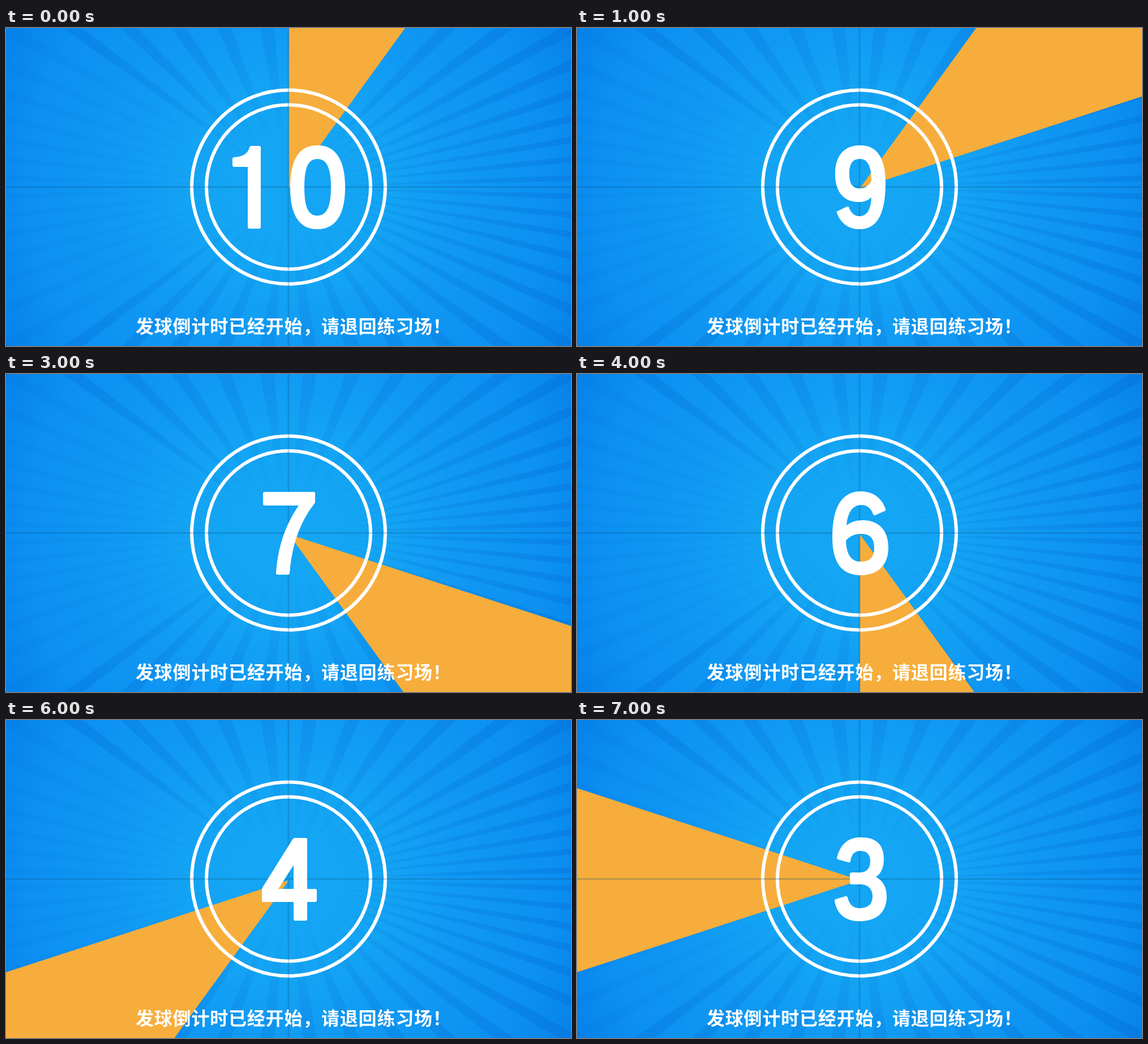
An HTML page that plays this animation: 998 by 561 pixels, repeating every 8 s.

```html
<!DOCTYPE html>
<html lang="zh-CN">
<head>
<meta charset="utf-8">
<title>倒计时</title>
<style>
html, body { margin: 0; width: 100%; height: 100%; overflow: hidden; background: #0d95f1; }
svg { display: block; width: 100vw; height: 100vh; }
text { font: 700 32px "Noto Sans CJK SC", "Noto Sans CJK", sans-serif; letter-spacing: .8px; fill: #fff; }
</style>
</head>
<body>
<svg viewBox="0 0 998 561" preserveAspectRatio="none">
  <defs>
    <radialGradient id="sky" gradientUnits="userSpaceOnUse" cx="499" cy="281" r="575">
      <stop offset="0" stop-color="#14a6f4"/>
      <stop offset=".3" stop-color="#14a4f4"/>
      <stop offset=".52" stop-color="#1099f4"/>
      <stop offset=".8" stop-color="#0c90f2"/>
      <stop offset="1" stop-color="#0682ea"/>
    </radialGradient>
    <radialGradient id="shade" gradientUnits="userSpaceOnUse" cx="499" cy="281" r="560">
      <stop offset=".15" stop-color="#0474d4" stop-opacity="0"/>
      <stop offset=".38" stop-color="#0474d4" stop-opacity=".2"/>
      <stop offset="1" stop-color="#0470d8" stop-opacity=".42"/>
    </radialGradient>
  </defs>
  <rect width="998" height="561" fill="url(#sky)"/>
  <g id="rays" fill="url(#shade)"></g>
  <path id="wedge" fill="#f6ad3c"/>
  <g fill="none" stroke="#fff" stroke-width="6">
    <circle cx="499" cy="280.5" r="171"/>
    <circle cx="499" cy="280.5" r="145"/>
  </g>
  <path d="M499 0V561M0 280.5H998" stroke="#0a4b7d" stroke-opacity=".24" stroke-width="3"/>
  <path id="digit" fill="#fff" fill-rule="evenodd" role="img"/>
  <text x="229" y="537.5">发球倒计时已经开始，请退回练习场！</text>
</svg>
<script>
const $ = id => document.getElementById(id);
const STEP = 1000, FIRST = 10, STEPS = 8;
const rad = deg => deg * Math.PI / 180;

const glyphs = {
  10: 'M433 208H447q3 0 3 3V351q0 3-3 3H430q-3 0-3-3V245H403q-3 0-3-3V231q0-3 3-3C418 227 427 222 430 211Q431 208 433 208Z' +
    'M550 207C584 207 599 235 599 281S584 355 550 355S502 327 502 281S516 207 550 207Z' +
    'M550 231C533 231 527 248 527 281S533 331 550 331S574 314 574 281S567 231 550 231Z',
  9: 'M480 316C484 326 490 332 499 332C512 332 519 321 520 299C514 304 507 307 498 307C471 307 456 289 456 258' +
    'C456 226 471 207 500 207C531 207 545 231 545 273C545 327 531 355 499 355C480 355 466 345 459 326Q458 324 460 323L477 315Q479 314 480 316Z' +
    'M520 270C520 245 514 231 500 231C486 231 481 240 481 257C481 275 487 283 499 283C508 283 515 279 520 270Z',
  8: 'M501 207C528 207 544 220 544 243C544 257 539 267 529 274C541 281 548 293 548 310C548 338 531 355 501 355' +
    'S453 338 453 310C453 293 460 281 473 274C463 267 458 257 458 243C458 220 474 207 501 207Z' +
    'M501 230C488 230 482 236 482 247S488 264 501 264S519 258 519 247S513 230 501 230Z' +
    'M501 287C485 287 478 295 478 309S485 332 501 332S523 323 523 309S516 287 501 287Z',
  7: 'M457 208H543q3 0 3 3V227C520 260 505 300 501 351Q501 354 498 354H480q-3 0-3-3C480 305 494 265 517 232H457q-3 0-3-3V211q0-3 3-3Z',
  6: 'M543 242L527 249Q524 250 523 247C519 236 511 231 502 231C488 231 478 243 476 267C484 261 493 258 504 258' +
    'C533 258 550 276 550 306C550 337 532 355 501 355C465 355 451 329 451 288C451 235 468 207 501 207C523 207 538 218 545 238Q546 241 543 242Z' +
    'M475 294C481 286 491 282 502 282C518 282 525 290 525 307C525 324 517 331 501 331C484 331 476 318 475 294Z',
  5: 'M468 208H537q3 0 3 3V228q0 3-3 3H489L486 257C491 253 498 251 506 251C533 251 548 271 548 301C548 335 530 355 499 355' +
    'C475 355 459 343 455 319Q454.500 317 457 316L474 311Q477 310 478 313C481 326 488 332 499 332C515 332 523 321 523 302' +
    'C523 284 515 274 502 274C493 274 488 277 484 283L461 280Q458 280 458 277L465 211Q465 208 468 208Z',
  4: 'M511 208H529q3 0 3 3V298H546q3 0 3 3V318q0 3-3 3H532V351q0 3-3 3H511q-3 0-3-3V321H455q-3 0-3-3V300Q452 297 454 294L506 211Q508 208 511 208Z' +
    'M508 256V298H481Z',
  3: 'M459 243C465 219 479 207 501 207C528 207 542 220 542 245C542 260 537 271 528 277C540 283 547 295 547 311' +
    'C547 339 530 355 499 355C475 355 459 343 455 319Q454.500 317 457 316L474 311Q477 310 478 313C481 326 488 332 499 332' +
    'C514 332 522 325 522 311C522 298 514 290 501 290H485q-3 0-3-3V272q0-3 3-3H500C512 269 518 261 518 249' +
    'C518 237 512 231 500 231C490 231 485 237 483 249Q482 252 479 251L461 246Q459 245 459 243Z'
};

// Sector with clockwise angles from twelve o'clock; k stretches it sideways.
function sector(cx, cy, from, to, k = 1) {
  const at = a => (cx + 1200 * k * Math.sin(rad(a))).toFixed(1) + ' ' + (cy - 1200 * Math.cos(rad(a))).toFixed(1);
  return `M${cx} ${cy}L${at(from)}L${at(to)}Z`;
}

function buildRays() {
  for (let i = 0; i < 48; i++) {
    const a = 3.75 + i * 7.5;
    const ray = document.createElementNS('http://www.w3.org/2000/svg', 'path');
    ray.setAttribute('d', sector(499, 281, a - 1.2, a + 1.2, 2.03));
    ray.setAttribute('opacity', Math.abs(a - 270) < 50 ? .3 : 1);
    $('rays').append(ray);
  }
}

let shown = -1;
function draw(ms) {
  const i = Math.floor(ms / STEP) % STEPS;
  if (i !== shown) {
    shown = i;
    $('wedge').setAttribute('d', sector(499.7, 282.7, i * 36, i * 36 + 36));
    $('digit').setAttribute('d', glyphs[FIRST - i]);
    $('digit').setAttribute('aria-label', FIRST - i);
  }
}

buildRays();
draw(0);
const start = performance.now();
requestAnimationFrame(function tick(now) {
  draw(Math.max(0, now - start));
  requestAnimationFrame(tick);
});
</script>
</body>
</html>
```
